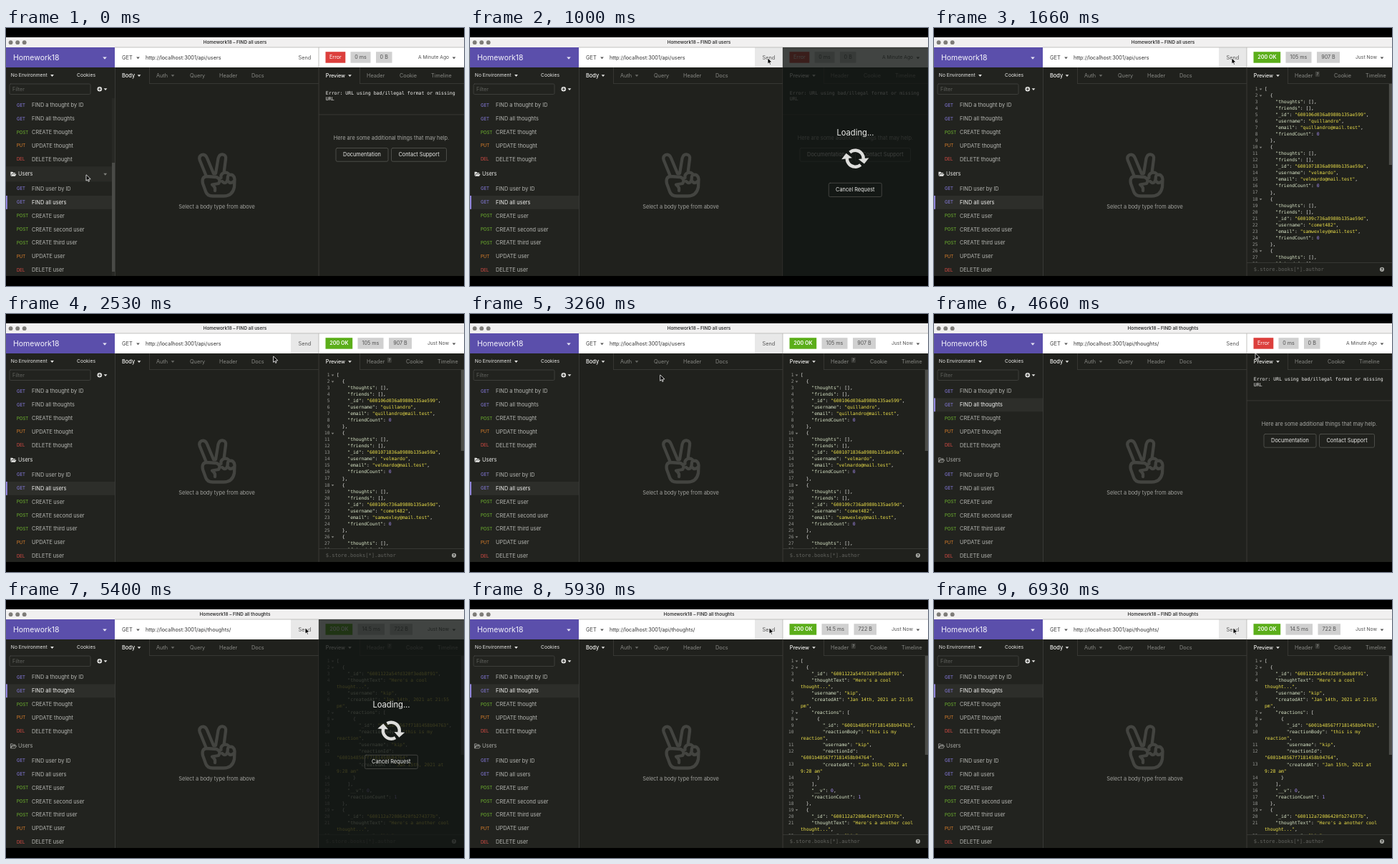
Animation, 640 px wide and 360 px high, one loop 7000 ms. Source, as an HTML page with a canvas:

```html
<!DOCTYPE html>
<html lang="en">
<head>
<meta charset="utf-8">
<title>Homework18</title>
<style>
html, body { margin: 0; width: 100%; height: 100%; overflow: hidden; background: #000; }
canvas { display: block; width: 640px; height: 360px; }
</style>
</head>
<body>
<canvas id="stage"></canvas>
<script>
const LOOP = 7000;
const SANS = 'Inter, "Liberation Sans", sans-serif';
const MONO = '"DejaVu Sans Mono", monospace';
const C = {
  bg: '#20211d', side: '#22231f', line: '#3c3d39', active: '#2d2e2a', hover: '#2a2b27',
  text: '#e6e6e4', soft: '#b6b7b3', dim: '#878884', edge: '#b4b4b2',
  purple: '#5b4fab', red: '#dc3f3c', green: '#5bae1a',
  key: '#d9e6c8', str: '#ece04a', num: '#a48cf0'
};
const METHOD = { GET: '#8d80ec', POST: '#74be30', PUT: '#e8862c', DEL: '#e24e47' };

const canvas = document.getElementById('stage');
const ctx = canvas.getContext('2d');
const dpr = window.devicePixelRatio || 1;
canvas.width = 640 * dpr;
canvas.height = 360 * dpr;

// Sidebar rows: method, label, centre y
const rows = [
  ['GET', 'FIND a thought by ID'], ['GET', 'FIND all thoughts'], ['POST', 'CREATE thought'],
  ['PUT', 'UPDATE thought'], ['DEL', 'DELETE thought'], [null, 'Users'],
  ['GET', 'FIND user by ID'], ['GET', 'FIND all users'], ['POST', 'CREATE user'],
  ['POST', 'CREATE second user'], ['POST', 'CREATE third user'],
  ['PUT', 'UPDATE user'], ['DEL', 'DELETE user']
].map(([method, label], i) => ({
  method, label,
  y: i < 5 ? 108 + 18.8 * i : i === 5 ? 203.8 : 224.5 + 18.87 * (i - 6)
}));

const user = (id, name, mail) => [
  '  {', '    "thoughts": [],', '    "friends": [],', `    "_id": "${id}",`,
  `    "username": "${name}",`, `    "email": "${mail}@mail.test",`,
  '    "friendCount": 0', '  },'
];
const usersJson = [
  '[',
  ...user('600106d036a8980b135ae599', 'quillandro', 'quillandro'),
  ...user('6001071836a8980b135ae59a', 'velmardo', 'velmardo'),
  ...user('600109c736a8980b135ae59d', 'comet482', 'samwexley'),
  '  {', '    "thoughts": [],', '    "friends": [],'
];
// A leading ~ marks the wrapped rest of the line above
const thoughtsJson = [
  '[', '  {',
  '    "_id": "6001122a54fd320f3edb8f91",',
  '    "thoughtText": "Here\'s a cool', '~thought...",',
  '    "username": "kip",',
  '    "createdAt": "Jan 14th, 2021 at 21:55', '~pm",',
  '    "reactions": [', '      {',
  '        "_id": "6001b48567f7181458b94763",',
  '        "reactionBody": "this is my', '~reaction",',
  '        "username": "kip",',
  '        "reactionId":', '~"6001b48567f7181458b94764",',
  '        "createdAt": "Jan 15th, 2021 at', '~9:28 am"',
  '      }', '    ],', '    "__v": 0,', '    "reactionCount": 1', '  },', '  {',
  '    "_id": "600112a72086420fb274377b",',
  '    "thoughtText": "Here\'s a another cool', '~thought...",',
  '    "username": "kip",'
];

// Pointer stops: time, x, y of the tip
const path = [
  [60, 112, 205], [900, 416, 42], [1800, 416, 42], [2500, 374, 59], [2860, 352, 66],
  [3000, 352, 66], [3700, 76.5, 127], [4340, 76.5, 127], [4660, 449, 55],
  [4800, 449, 55], [5080, 418, 39]
];
const ease = u => u * u * (3 - 2 * u);
function pointer(t) {
  if (t <= path[0][0]) return path[0].slice(1);
  for (let i = 1; i < path.length; i++) {
    const [t0, x0, y0] = path[i - 1], [t1, x1, y1] = path[i];
    if (t < t1) {
      const k = ease((t - t0) / (t1 - t0));
      return [x0 + (x1 - x0) * k, y0 + (y1 - y0) * k];
    }
  }
  return path[path.length - 1].slice(1);
}

function rect(x, y, w, h, color) {
  ctx.fillStyle = color;
  ctx.fillRect(x, y, w, h);
}
function text(s, x, y, color, size = 7.4, { align = 'left', weight = 400, family = SANS } = {}) {
  ctx.font = `${weight} ${size}px ${family}`;
  ctx.textAlign = align;
  ctx.textBaseline = 'middle';
  ctx.fillStyle = color;
  ctx.fillText(s, x, y);
}
const mono = (s, x, y, color, size = 6.36, align = 'left') =>
  text(s, x, y, color, size, { align, family: MONO });
function poly(points, color) {
  ctx.fillStyle = color;
  ctx.beginPath();
  points.forEach(([x, y]) => ctx.lineTo(x, y));
  ctx.closePath();
  ctx.fill();
}
const caret = (x, y, color, r = 2.4) =>
  poly([[x - r, y - r / 2], [x + r, y - r / 2], [x, y + r * 0.7]], color);
function disc(x, y, r, color) {
  ctx.fillStyle = color;
  ctx.beginPath();
  ctx.arc(x, y, r, 0, 7);
  ctx.fill();
}
function box(x, y, w, h, r, stroke, fill) {
  ctx.beginPath();
  ctx.roundRect(x, y, w, h, r);
  if (fill) { ctx.fillStyle = fill; ctx.fill(); }
  if (stroke) { ctx.strokeStyle = stroke; ctx.lineWidth = 0.8; ctx.stroke(); }
}
function button(x, y, w, h, label, stroke) {
  box(x, y, w, h, 2, stroke);
  text(label, x + w / 2, y + h / 2, '#ececea', 7.35, { align: 'center' });
}
function chip(x, w, label, bg, color, weight) {
  rect(x, 33.2, w, 15.5, bg);
  text(label, x + w / 2, 41.3, color, 7.2, { align: 'center', weight });
}

function titleBar(s) {
  rect(0, 13, 640, 14, '#f1f0f0');
  [6.6, 16.2, 25.7].forEach(x => disc(x, 20.2, 2.9, '#7e7c78'));
  text(`Homework18 – FIND all ${s.thoughts ? 'thoughts' : 'users'}`, 320, 20.3, '#333', 6.35,
    { align: 'center', weight: 600 });
}

function folder(y, open, color) {
  ctx.strokeStyle = ctx.fillStyle = color;
  ctx.lineWidth = 0.8;
  ctx.lineJoin = 'round';
  const draw = () => open ? ctx.stroke() : ctx.fill();
  ctx.beginPath();
  [[6.4, 2.6], [6.4, -3], [9.2, -3], [10.2, -1.9], [13, -1.9], [13, -0.7], [8.4, -0.7]]
    .forEach(([x, dy]) => ctx.lineTo(x, y + dy));
  ctx.closePath();
  draw();
  ctx.beginPath();
  [[8.6, 0], [14.6, 0], [12.8, 3], [6.8, 3]].forEach(([x, dy]) => ctx.lineTo(x, y + dy));
  ctx.closePath();
  draw();
}

function sidebar(s) {
  rect(0, 27, 152, 319, C.side);
  rect(0, 27, 152, 28, C.purple);
  text('Homework18', 10, 41.5, '#f4f3fb', 10.5);
  caret(138, 41.8, '#e8e6f6', 2.8);
  text('No Environment', 6.8, 66.2, C.text, 6.75);
  caret(64.5, 66.2, C.text);
  text('Cookies', 99, 66.2, C.text, 6.8);
  box(5, 78, 113, 14.5, 1.5, '#454642');
  text('Filter', 9, 85.4, '#62635f', 7.2);
  disc(130.8, 85.2, 3.3, C.text);
  rect(128.8, 84.8, 4, 0.9, C.side);
  rect(130.35, 83.2, 0.9, 4, C.side);
  caret(139, 85.4, C.text);

  const inside = s.x < 152 && s.y > 98;
  rows.forEach(({ method, label, y }, i) => {
    const active = i === (s.thoughts ? 1 : 7);
    const half = method ? 9.4 : 10.6;
    const over = inside && Math.abs(s.y - y) <= half;
    if (active || over) rect(0, y - half, 152, half * 2, active ? C.active : C.hover);
    if (active) rect(0, y - half, 1.8, half * 2, '#978ae6');
    if (method) {
      text(method, 15, y + 0.2, METHOD[method], 6);
      text(label, 36, y + 0.2, active ? '#f2f2f0' : C.soft);
    } else {
      const color = s.thoughts ? '#a9aaa6' : C.text;
      folder(y, s.thoughts, color);
      text(label, 17, y + 0.2, color);
    }
    if (over) caret(138.7, y + 0.2, '#83847f');
  });
  if (inside) {
    rect(148, 98, 4, 248, '#282925');
    rect(148, 188, 4, 152, '#4a4b47');
  }
}

function hand() {
  ctx.strokeStyle = '#434440';
  ctx.lineWidth = 4.3;
  ctx.lineJoin = ctx.lineCap = 'round';
  ctx.stroke(new Path2D('M280 207L270.8 184.5Q269 179 273.5 177Q278.5 175.5 281 181.5L290 203L293 203' +
    'L296.5 182Q298 176 302.5 176.3Q308 177 307 183L304.5 202Q309.5 200.5 312 205Q318.5 203.5 319.5 211' +
    'L319 222Q316.5 234.5 304 234.5L289 234.5Q281 234.5 279 228L275 217Q273 208 280 207' +
    'L294 208Q301 211 297 217L288 218.5Q293 222 292 227' +
    'M304.5 202Q299.5 204 300.5 209M302 214Q307 219 309.5 212L310 207' +
    'M310.5 214Q314 218 318 214'));
}

function requestPane(s) {
  rect(152, 27, 285, 28, '#fff');
  rect(152, 55, 285, 291, C.bg);
  if (s.hot) rect(398, 27, 39, 28, '#e8e8e8');
  text('GET', 162, 41.4, '#444');
  caret(184.5, 41.6, '#555');
  text(`http://localhost:3001/api/${s.thoughts ? 'thoughts/' : 'users'}`, 195, 41.4, '#333', 7.3);
  text('Send', 408.5, 41.5, '#555', 7.3);
  text('Body', 162, 66.4, '#f6f6f4', 7.4, { weight: 500 });
  caret(186, 66.4, C.text);
  [['Auth', 210], ['Query', 257], ['Header', 298], ['Docs', 343]]
    .forEach(([label, x]) => text(label, x, 66.4, C.dim, 7.3));
  caret(233, 66.4, '#6c6d69');
  rect(200, 55, 0.8, 22.5, C.line);
  rect(200, 77, 237, 0.8, C.line);
  hand();
  text('Select a body type from above', 294.5, 250.2, '#a0a19d', 7.37, { align: 'center' });
  rect(152, 55, 0.9, 291, C.line);
}

function errorBody() {
  mono('Error: URL using bad/illegal format or missing', 446.8, 91.3, '#f0f0ee', 6.54);
  mono('URL', 446.8, 98.9, '#f0f0ee', 6.54);
  rect(437, 120.5, 203, 0.8, C.line);
  text('Here are some additional things that may help.', 538.5, 154.2, '#a6a7a3', 7.37, { align: 'center' });
  button(461, 167.5, 73, 18.7, 'Documentation', '#575854');
  button(538.5, 167.5, 77, 18.7, 'Contact Support', '#575854');
}

function codeLine(line, y) {
  let x = 462;
  const put = (part, color) => {
    mono(part, x, y, color);
    x += ctx.measureText(part).width;
  };
  if (line[0] === '~') {
    put(line.slice(1).replace(/,$/, ''), C.str);
    if (line.endsWith(',')) put(',', C.text);
    return;
  }
  for (const part of line.match(/"[^"]*"(?=:)|"[^"]*"?|\d+|[^"\d]+/g)) {
    const rest = line.slice(line.indexOf(part) + part.length);
    const color = /^\d/.test(part) ? C.num
      : part[0] !== '"' ? C.text
      : rest[0] === ':' ? C.key : C.str;
    put(part, color);
  }
}

function jsonBody(lines, thumb) {
  ctx.save();
  ctx.beginPath();
  ctx.rect(437, 78, 203, 249);
  ctx.clip();
  let n = 0;
  lines.forEach((line, i) => {
    const y = 85.4 + 9.03 * i;
    if (line[0] !== '~') {
      mono(String(++n), 452.5, y, '#969793', 6.2, 'right');
      if (/[[{]$/.test(line)) caret(456.5, y, '#858682', 1.8);
    }
    codeLine(line, y);
  });
  rect(635.8, 78, 4.2, thumb, '#4c4d49');
  ctx.restore();
  rect(437, 327, 203, 0.8, C.line);
  mono('$.store.books[*].author', 446.8, 337, '#62635f', 7.08);
  disc(626, 336.8, 3.1, '#a4a5a1');
  text('?', 626, 337, C.bg, 5.2, { align: 'center', weight: 700 });
}

function responsePane(s) {
  rect(437, 27, 203, 28, '#fff');
  rect(437, 55, 203, 291, C.bg);
  const grey = '#d0d0d0', ink = '#505050';
  if (s.error) {
    chip(446.5, 27.8, 'Error', C.red, '#fff');
    chip(481.5, 28, '0 ms', grey, ink);
    chip(517, 22.5, '0 B', grey, ink);
    text('A Minute Ago', 576, 41.4, ink, 6.75);
  } else {
    chip(446.5, 37.7, '200 OK', C.green, '#fff', 600);
    if (s.thoughts) {
      chip(491.5, 37.5, '14.5 ms', grey, ink);
      chip(536.5, 31.5, '722 B', grey, ink);
    } else {
      chip(491.5, 36, '105 ms', grey, ink);
      chip(535, 32, '907 B', grey, ink);
    }
    text('Just Now', 589, 41.4, ink, 6.75);
  }
  caret(626, 41.6, ink);

  text('Preview', 446.8, 66.4, '#f6f6f4', 7.15, { weight: 500 });
  caret(480.5, 66.4, C.text);
  const shift = s.error ? 0 : 9;
  text('Header', 504, 66.4, C.dim, 7.3);
  text('Cookie', 550 + shift, 66.4, C.dim, 7.3);
  text('Timeline', 594 + shift, 66.4, C.dim, 7.2);
  if (!s.error) {
    box(532.8, 60.5, 6, 7.4, 1, null, '#3a3b37');
    text('7', 535.8, 64.3, '#b0b1ad', 5, { align: 'center' });
  }
  rect(494, 55, 0.8, 22.5, C.line);
  rect(494, 77, 146, 0.8, C.line);

  if (s.error) errorBody();
  else if (s.thoughts) jsonBody(thoughtsJson, 138);
  else jsonBody(usersJson, 113);
  rect(436.6, 55, 0.9, 291, C.line);
}

function headerEdges() {
  rect(152, 26.6, 488, 0.8, C.edge);
  rect(436.6, 27, 0.8, 28, C.edge);
}

function loading(age) {
  rect(437, 27, 203, 319, 'rgba(18,22,19,.8)');
  text('Loading...', 538.5, 146.3, '#f0f0ee', 11.2, { align: 'center' });
  ctx.save();
  ctx.translate(538.3, 182.2);
  ctx.rotate((age / 2000 + 0.07) * Math.PI * 2);
  ctx.strokeStyle = '#dededc';
  ctx.lineWidth = 4.4;
  ctx.lineCap = 'butt';
  for (let k = 0; k < 2; k++) {
    ctx.beginPath();
    ctx.arc(0, 0, 11.5, -2.95, -0.6);
    ctx.stroke();
    poly([[14.5, -12.5], [14.5, -2], [4, -2]], '#dededc');
    ctx.rotate(Math.PI);
  }
  ctx.restore();
  button(501.3, 216.3, 74, 19.2, 'Cancel Request', '#4e4f4b');
}

function cursor(x, y) {
  const shape = [[0, 0], [0, 8.2], [1.9, 6.5], [3.2, 9.3], [4.5, 8.7], [3.2, 6], [5.8, 5.8]]
    .map(([dx, dy]) => [x + dx, y + dy]);
  ctx.lineJoin = 'round';
  poly(shape, '#000');
  ctx.strokeStyle = '#fff';
  ctx.lineWidth = 0.8;
  ctx.stroke();
}

function render(t) {
  const [x, y] = pointer(t);
  const start = t < 3000 ? 930 : 5270;
  const end = t < 3000 ? 1260 : 5530;
  const s = {
    x, y,
    thoughts: t >= 3930,
    error: t < 1060 || (t >= 3930 && t < 5330),
    // the button keeps its focus shade until the next press
    hot: (t >= 800 && t < 3830) || (x > 398 && x < 437 && y > 27 && y < 55 && t > 4700)
  };
  ctx.setTransform(dpr, 0, 0, dpr, 0, 0);
  rect(0, 0, 640, 360, '#000');
  titleBar(s);
  sidebar(s);
  requestPane(s);
  responsePane(s);
  headerEdges();
  if (t >= start && t < end) loading(t - start);
  cursor(x, y);
}

const begin = performance.now();
function frame() {
  render((performance.now() - begin) % LOOP);
  requestAnimationFrame(frame);
}
frame();
</script>
</body>
</html>
```
